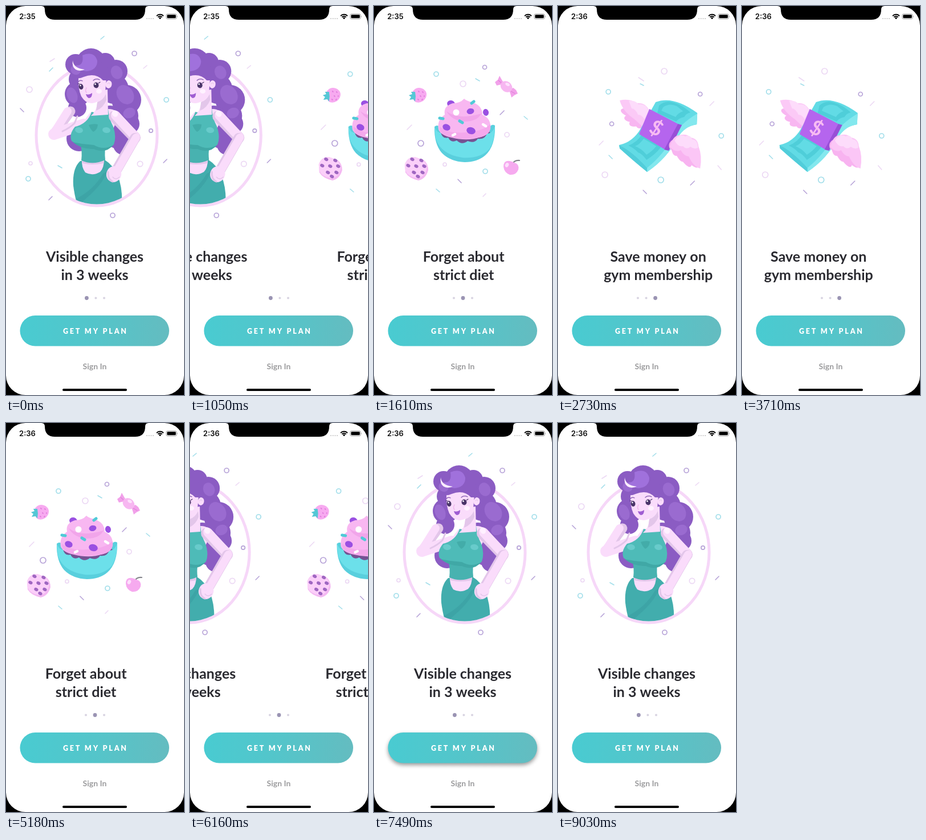
An HTML page with a canvas for the animation above (9100 ms loop, 312 by 680 pixels).

```html
<!DOCTYPE html>
<html lang="en">
<head>
<meta charset="utf-8">
<title>Onboarding</title>
<style>
  html, body { margin: 0; width: 100%; height: 100%; overflow: hidden; background: #000; }
  canvas { display: block; width: 312px; height: 680px; }
</style>
</head>
<body>
<canvas id="stage"></canvas>
<script>
const W = 312, H = 680, LOOP = 9100, STEP = 70, PAGE = 314, MID = 155.5;
const CYAN = '#a2deea', PURPLE = '#b7a3d8', PINK = '#ecd8f4';
const SKIN = '#fadcfb', SHADE = '#e3c6ea', HAIR = '#8b5cc3', HAIR_LIGHT = '#9a6bd0';
const canvas = document.getElementById('stage');
const ratio = window.devicePixelRatio || 1;
canvas.width = W * ratio;
canvas.height = H * ratio;
const c = canvas.getContext('2d');

// ---------- helpers ----------
function fill(d, color) {
  c.fillStyle = color;
  c.fill(new Path2D(d));
}
function line(d, color, width) {
  c.strokeStyle = color;
  c.lineWidth = width;
  c.lineCap = c.lineJoin = 'round';
  c.stroke(new Path2D(d));
}
function oval(x, y, rx, ry, color, angle = 0) {
  c.fillStyle = color;
  c.beginPath();
  c.ellipse(x, y, rx, ry, angle, 0, Math.PI * 2);
  c.fill();
}
function pill(x, y, w, h, color) {
  c.fillStyle = color;
  c.beginPath();
  c.roundRect(x, y, w, h, h / 2);
  c.fill();
}
function text(s, x, y, font, color, spacing = 0) {
  c.font = font;
  c.fillStyle = color;
  c.textAlign = 'center';
  c.letterSpacing = spacing + 'px';
  c.fillText(s, x + spacing / 2, y);
  c.letterSpacing = '0px';
}
function title(a, b) {
  const font = '700 25px Lato, sans-serif';
  text(a, MID, 447, font, '#2a2a30');
  text(b, MID, 479, font, '#2a2a30');
}
function ring(color, ...spots) {
  c.strokeStyle = color;
  c.lineWidth = 1.7;
  for (const [x, y, r] of spots) {
    c.beginPath();
    c.arc(x, y, r, 0, Math.PI * 2);
    c.stroke();
  }
}
const dash = (color, d) => line(d, color, 1.6);

// ---------- page 1: woman in an oval ----------
function drawHair() {
  const lobes = [
    [122, 102, 18], [149, 100, 26], [174, 99, 17], [193, 114, 20], [125, 154, 22], [128, 128, 18],
    [189, 145, 26], [211, 164, 26], [208, 192, 24], [216, 206, 18], [198, 224, 26],
    [205, 243, 17], [128, 232, 22], [182, 200, 26], [125, 178, 16]
  ];
  for (const [x, y, r] of lobes) oval(x, y, r, r, HAIR);
  oval(209, 155, 14, 18, HAIR_LIGHT, -0.6);
  oval(194, 116, 10, 12, HAIR_LIGHT, -0.4);
  oval(216, 187, 11, 9, HAIR_LIGHT, -0.4);
  oval(116, 156, 9, 14, HAIR_LIGHT, -0.35);
}
function drawFace() {
  fill('M163 148 L178 146 L179 190 L149 192 Q158 184 160 171 Z', SKIN);
  fill('M160 168 Q170 165 175 154 L176 164 Q171 178 158 183 Z', SHADE);
  fill('M127 123 Q126 145 132 158 Q140 171 151 170 Q167 168 174 149 L176 125 Q151 110 127 123 Z', SKIN);
  oval(180, 137, 5.5, 7, SKIN, 0.2);
  line('M178 136 Q180 133 182 136', SHADE, 1.2);
  fill('M111 111 Q119 132 136 124 Q157 116 170 130 L178 130 Q185 111 171 100 Q145 82 117 96 Z', HAIR);
  oval(122, 112, 9, 8, HAIR_LIGHT, 0.6);
  fill('M134 86 Q155 78 160 96 Q160 112 141 114 Q128 112 122 104 Q137 105 134 86 Z', '#a071dc');
  fill('M117 95 Q118 109 138 111 Q129 115 122 111 Q115 106 117 95 Z', '#fdeefe');
  oval(131.5, 141, 4, 5, '#4a3569', -0.2);
  oval(158, 138.5, 4.5, 5, '#4a3569', -0.1);
  oval(130.5, 139, 1.2, 1.4, '#fff');
  oval(156.5, 136.5, 1.3, 1.5, '#fff');
  line('M126 136 L129 136 M162 135 L165 133', '#4a3569', 1.1);
  line('M127 132 Q130 129 134 131 M153 130 Q158 126 164 129', '#8257ae', 1.3);
  line('M141 143 Q138 149 141 151', '#efb8ed', 1.6);
  fill('M140 154 Q146 156 151 152 Q151 161 145 161 Q141 159 140 154 Z', '#a05dd2');
  oval(163, 149, 5, 4, '#fff2ff');
}
function drawBody() {
  line('M113 184 L84 224', SHADE, 17);
  line('M108 184 L84 222', SKIN, 14);
  line('M84 224 Q105 217 136 207', SKIN, 20);
  line('M99 219 Q112 213 120 205 L125 193', SHADE, 3);
  fill('M148 186 L180 180 Q196 180 197 196 L185 220 L130 220 Q132 204 148 186 Z', SKIN);

  c.save();
  c.beginPath();
  c.ellipse(159, 226, 105, 120.5, 0, 0, Math.PI * 2);
  c.clip();
  fill('M130 271 Q116 284 118 314 Q120 331 126 352 L203 352 Q205 319 196 297 Q188 278 173 269 Z', '#42adad');
  fill('M178 289 Q168 313 143 334 L127 349 L123 337 Q154 321 170 293 Z', '#3da4a6');
  c.restore();

  fill('M133 267 L172 267 Q172 283 165 290 Q152 298 139 291 Q132 282 133 267 Z', SKIN);
  fill('M133 269 L172 267 L171 275 Q151 279 134 275 Z', SHADE);
  fill('M130 238 L176 238 Q172 253 174 269 Q152 279 132 270 Q134 254 130 238 Z', '#48b2b0');
  fill('M150 185 Q164 190 179 180 Q180 196 188 211 Q194 229 189 242 Q174 259 154 246 Q130 248 115 236 Q110 224 121 211 Q143 206 150 185 Z', '#4ebbb8');
  fill('M117 238 Q135 242 154 243 Q171 253 188 243 Q175 259 154 250 Q133 251 117 238 Z', '#40a8a6');
  fill('M145 208 Q153 205 161 207 Q160 217 153 220 Q148 216 145 208 Z', '#43aca9');
  oval(128, 217, 7, 5, '#68cbcb', 0.15);
  oval(176, 217, 7, 5, '#68cbcb', 0.15);

  line('M190 193 L226 230', SHADE, 20);
  line('M192 191 L227 229', SKIN, 16);
  line('M226 231 L193 288', SHADE, 18);
  line('M228 230 L195 287', SKIN, 14);
  oval(191, 188, 5, 6, '#fff0ff', -0.5);
  oval(189, 294, 13, 14, SKIN, 0.4);
  line('M179 290 Q178 303 187 307', SHADE, 3);
  line('M187 299 Q192 305 199 299', SHADE, 1.5);
}
function pageOne() {
  ring(PURPLE, [225, 83, 4], [254, 218, 3.2], [187, 366, 4]);
  ring(CYAN, [281, 164, 4], [39, 302, 4]);
  ring(PINK, [235, 276, 4.7], [43, 275, 3], [41, 146, 5]);
  dash(CYAN, 'M166 58L172 53 M76 114L82 108 M91 279L98 283');
  dash(PURPLE, 'M25 179L31 185 M75 339L81 333 M276 274L282 268');
  dash(PINK, 'M77 97L85 92 M241 109L247 104');
  c.strokeStyle = '#f6d7f8';
  c.lineWidth = 5;
  c.beginPath();
  c.ellipse(159, 226, 106, 123, 0, 0, Math.PI * 2);
  c.stroke();
  drawHair();
  drawBody();
  drawFace();
  title('Visible changes', 'in 3 weeks');
}

// ---------- page 2: sweets ----------
function drawCupcake() {
  const chip = '#9a50e2', mint = '#50cad7';
  oval(135, 171, 7, 6, chip, 0.3);
  oval(196, 186, 5, 6, chip, -0.2);
  fill('M106 211 Q111 206 117 213 L201 213 Q207 205 212 209 Q213 245 195 261 Q181 273 159 273 Q134 272 119 257 Q105 241 106 211 Z', '#59cfdd');
  oval(159, 225, 46, 16, '#765293');
  fill('M106 211 Q110 222 117 221 Q120 233 130 230 Q135 240 145 235 Q154 244 164 236 Q176 241 182 232 Q194 234 198 223 Q208 223 212 210 Q212 234 203 249 Q188 267 155 265 Q118 260 108 232 Z', '#6ce0ea');
  fill('M113 216 Q110 199 124 190 Q121 175 138 170 Q151 170 158 162 Q162 166 172 168 Q190 174 190 190 Q206 197 204 215 Q201 226 187 229 Q164 237 136 230 Q117 226 113 216 Z', '#f8b7f1');
  fill('M115 211 Q132 224 159 221 Q188 220 204 207 Q206 223 188 229 Q158 236 130 228 Q114 223 115 211 Z', '#f4a8ec');
  fill('M127 184 Q148 200 188 188 Q181 202 158 202 Q136 200 127 184 Z', '#f1a5ea');
  oval(169, 184, 6.5, 5, chip, -0.2);
  oval(127, 212, 7, 5.5, chip, 0.4);
  oval(170, 218, 8, 6, chip, 0.3);
  oval(144, 186, 5.5, 5.5, '#fff');
  line('M171 170L175 167 M115 196L121 197 M150 201L155 204', mint, 5);
  line('M191 207L196 210 M138 226L142 224', '#fff', 4.5);
}
function drawTreats() {
  fill('M67 151 Q73 140 84 144 Q95 149 91 160 Q85 171 73 168 Q66 164 67 151 Z', '#f7aaf0');
  fill('M72 150 L65 150 L67 154 L61 156 L65 159 L62 164 L69 163 L72 167 L73 158 Z', '#55c7d5');
  line('M78 149L79 150 M85 150L86 151 M81 157L82 158 M88 157L88 158 M77 163L78 164 M84 164L85 163', '#e27ddd', 1.8);

  fill('M228 136 L220 122 L217 129 L212 133 L215 139 Z', '#f2a1ea');
  fill('M237 147 L241 160 L246 156 L252 153 L249 147 L244 143 Z', '#f2a1ea');
  line('M218 130L226 137 M240 149L247 153', '#df84da', 1.2);
  oval(232, 141, 11, 9, '#f7b7f1', 0.6);
  oval(234, 137, 4, 2.5, '#fde1fc', 0.5);

  fill('M54 277 Q58 264 72 264 L88 270 Q95 276 95 287 Q91 302 78 305 Q61 301 55 291 Z', '#f4b9f2');
  fill('M54 277 Q59 264 72 264 L86 269 Q94 277 92 286 Q87 300 75 301 Q59 298 55 288 Z', '#fbcff9');
  const chips = [[67, 268], [83, 270], [60, 279], [74, 280], [88, 280], [70, 291], [85, 291], [77, 298]];
  for (const [x, y] of chips) oval(x, y, 3.8, 2.8, '#a067c2', 0.5);

  line('M243 276 Q246 269 255 270', '#85858c', 2.2);
  fill('M227 281 Q227 269 238 271 Q243 272 246 274 Q255 276 253 286 Q249 296 238 295 Q228 291 227 281 Z', '#f6aaef');
  oval(233, 278, 3, 4, '#fde0fc', 0.5);
}
function pageTwo() {
  c.translate(-1.6, 0);
  ring(CYAN, [109, 119, 4], [195, 289, 4]);
  ring(PURPLE, [194, 107, 3.5], [82, 240, 5]);
  ring(PINK, [156, 136, 5], [233, 225, 4], [124, 277, 3]);
  dash(CYAN, 'M178 127L185 131 M263 193L269 198 M109 320L115 325');
  dash(PURPLE, 'M221 190L228 183 M147 303L153 309');
  dash(PINK, 'M58 216L66 208 M191 333L196 328');
  drawCupcake();
  drawTreats();
  c.translate(1.6, 0);
  title('Forget about', 'strict diet');
}

// ---------- page 3: flying banknote ----------
function feathers(rootX, rootY, width, color, tips) {
  for (const [x, y] of tips) {
    const len = Math.hypot(x - rootX, y - rootY);
    oval((x + rootX) / 2, (y + rootY) / 2, len / 2, width, color, Math.atan2(y - rootY, x - rootX));
  }
}
function drawNote() {
  feathers(134, 196, 8, '#f8b6f1', [[87, 182], [93, 196], [102, 207], [115, 212]]);
  fill('M85 165 Q103 161 114 170 Q130 168 137 183 L125 211 L111 198 Q90 184 85 165 Z', '#fbc9f6');
  fill('M101 166 Q111 164 118 172 Q130 170 136 183 L128 198 Q124 190 117 190 Q113 180 106 179 Z', '#fddcfb');

  fill('M148 168 Q179 156 221 187 L220 207 Q197 211 188 228 Q169 265 133 290 Q107 269 85 249 L84 243 Q108 238 122 214 Z', '#62dbe5');
  fill('M84 243 Q107 254 133 283 Q162 260 180 226 Q191 206 221 188 L220 207 Q199 210 187 230 Q168 267 133 290 Q107 268 85 249 Z', '#83e8ee');
  fill('M84 243 Q107 254 133 283 L133 290 Q107 269 85 249 Z', '#51cdda');
  fill('M154 174 Q165 164 180 169 Q193 172 209 186 Q201 188 198 194 Q188 196 184 202 L151 187 Z', '#4fced9');
  fill('M161 177 Q172 169 185 175 L196 184 Q187 187 183 194 L158 183 Z', '#62dbe5');
  fill('M124 224 Q116 238 100 244 Q110 248 117 256 Q124 258 132 269 Q148 259 157 247 Z', '#4fced9');
  fill('M127 232 Q119 243 112 245 Q123 249 132 260 Q143 253 149 245 Z', '#62dbe5');

  fill('M137 180 L187 206 L166 252 L119 224 Z', '#b565ee');
  fill('M187 206 L194 208 Q182 232 171 253 L163 251 Z', '#994fd7');
  c.save();
  c.translate(149, 214);
  c.rotate(0.5);
  text('$', 0, 12, '700 36px Lato, sans-serif', '#f8bbf3');
  c.restore();

  feathers(184, 234, 8.5, '#f8b3f0', [[222, 282], [209, 281], [197, 272], [184, 262], [176, 252]]);
  fill('M173 246 Q178 226 190 226 Q201 222 210 230 Q222 232 223 245 Q230 262 226 284 Q214 281 206 263 Q198 263 192 252 Q182 257 173 246 Z', '#fbc6f6');
  fill('M181 235 Q190 222 200 228 Q208 224 212 233 Q222 234 222 248 Q215 251 209 246 Q202 252 196 245 Q187 247 181 235 Z', '#fddcfb');
}
function pageThree() {
  c.translate(3, 0);
  ring(CYAN, [65, 150, 4], [263, 227, 4], [157, 304, 5]);
  ring(PURPLE, [226, 154, 3.5], [71, 206, 3.5]);
  ring(PINK, [163, 114, 5], [59, 295, 5]);
  dash(CYAN, 'M121 136L127 139 M66 261L72 267');
  dash(PURPLE, 'M126 322L132 328 M209 313L216 306');
  dash(PINK, 'M118 125L127 131 M243 174L250 167 M49 243L56 236 M257 279L263 286');
  drawNote();
  c.translate(-3, 0);
  title('Save money on', 'gym membership');
}

// ---------- motion ----------
const clamp = v => Math.max(0, Math.min(1, v));

// finger drag, then exponential settling to 1
function swipe(t) {
  if (t <= 0) return 0;
  if (t < 160) return 0.4 * (t / 160) ** 2;
  return 1 - 0.6 * Math.exp((160 - t) / 120);
}
function overscroll(t) {
  if (t <= 0) return 0;
  if (t < 260) return 60 * Math.sin(t / 260 * Math.PI / 2);
  return 60 * Math.exp((260 - t) / 120);
}
function scrollAt(t) {
  const page = swipe(t - 880) + swipe(t - 2302) - swipe(t - 4720) - swipe(t - 5981);
  const x = page * PAGE + overscroll(t - 3650);
  return Math.abs(x - Math.round(page) * PAGE) < 0.3 ? Math.round(page) * PAGE : x;
}
const pulse = (t, a, b, c, d) => clamp((t - a) / (b - a)) * (1 - clamp((t - c) / (d - c)));

// ---------- fixed interface ----------
function drawDots(active) {
  let x = 138;
  for (let i = 0; i < 3; i++) {
    const on = i === active, r = on ? 3.4 : 2;
    oval(x + r, 510.5, r, r, on ? '#9a94b3' : '#d8d4e1');
    x += r * 2 + 10.6;
  }
}
function drawButton(press) {
  const g = c.createLinearGradient(25, 0, 286, 0);
  g.addColorStop(0, '#49cbd1');
  g.addColorStop(0.5, '#54c5ca');
  g.addColorStop(1, '#64bcc0');
  c.save();
  if (press > 0) {
    c.shadowColor = `rgba(0,0,0,${0.4 * press})`;
    c.shadowBlur = 7 * ratio;
    c.shadowOffsetY = 3.5 * ratio;
  }
  pill(24.5, 541, 261.5, 53.5, g);
  c.restore();
  text('GET MY PLAN', MID, 573, '900 12.5px Lato, sans-serif', '#fff', 2.8);
}
function drawStatus(t) {
  text(t < 1820 ? '2:35' : '2:36', 37.5, 23, '600 13px Inter, sans-serif', '#111');
  for (let i = 0; i < 4; i++) oval(247 + i * 3.7, 22, 1.1, 1.1, '#c6c6c6');
  c.lineCap = 'butt';
  c.strokeStyle = '#000';
  c.lineWidth = 2;
  for (const r of [8.2, 5]) {
    c.beginPath();
    c.arc(270, 23, r, -Math.PI * 0.76, -Math.PI * 0.24);
    c.stroke();
  }
  fill('M270 23.2 L267.7 20.8 Q270 18.8 272.3 20.8 Z', '#000');
  c.strokeStyle = '#999';
  c.lineWidth = 0.9;
  c.beginPath();
  c.roundRect(280.8, 13.8, 18.4, 9, 2.6);
  c.stroke();
  c.fillStyle = '#000';
  c.beginPath();
  c.roundRect(282.3, 15.3, 15.4, 6, 1.4);
  c.fill();
  fill('M300.3 16.7 Q301.7 18.3 300.3 19.9 Z', '#999');
}

function draw(t) {
  c.setTransform(ratio, 0, 0, ratio, 0, 0);
  c.fillStyle = '#000';
  c.fillRect(0, 0, W, H);
  c.save();
  c.beginPath();
  c.roundRect(0, 0, W, H, 34);
  c.clip();
  c.fillStyle = '#fff';
  c.fillRect(0, 0, W, H);

  const scroll = scrollAt(t);
  [pageOne, pageTwo, pageThree].forEach((page, i) => {
    const x = i * PAGE - scroll;
    if (Math.abs(x) >= W) return;
    c.save();
    c.translate(x, 0);
    page();
    c.restore();
  });

  drawDots(Math.min(2, Math.round(scroll / PAGE)));
  drawButton(pulse(t, 7340, 7490, 7770, 8050));
  c.globalAlpha = 1 - 0.5 * pulse(t, 8500, 8570, 8700, 8900);
  text('Sign In', MID, 635, '700 14px Lato, sans-serif', '#9c9c9e');
  c.globalAlpha = 1;
  pill(99, 669, 113, 4, '#000');
  drawStatus(t);
  fill('M62 0 Q68 0 68 6 Q68 24 86 24 L226 24 Q244 24 244 6 Q244 0 250 0 Z', '#000');
  c.restore();
}

const start = performance.now();
function frame() {
  const t = (performance.now() - start) % LOOP;
  draw(Math.floor(t / STEP) * STEP);
  requestAnimationFrame(frame);
}
frame();
</script>
</body>
</html>
```
